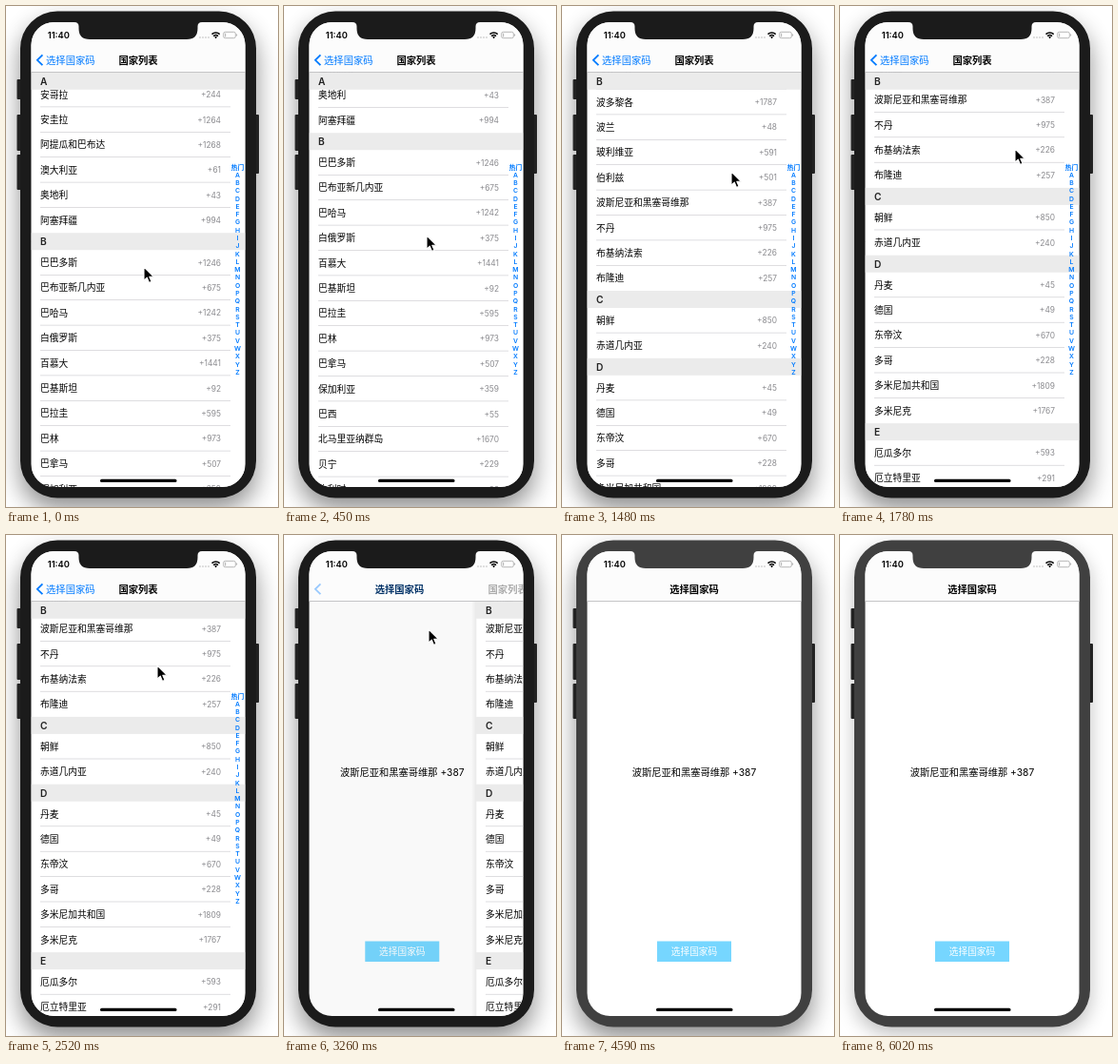
An HTML page that plays this animation: 286x526 px, repeating every 6.12 s.

```html
<!DOCTYPE html>
<html lang="zh-CN">
<head>
<meta charset="utf-8">
<title>国家列表</title>
<style>
  html, body { margin: 0; width: 100%; height: 100%; overflow: hidden; background: #fff; }
  svg { display: block; width: 286px; height: 526px; }
  text { font-family: Inter, "Noto Sans CJK SC", "Noto Sans CJK", sans-serif; white-space: pre; }
</style>
</head>
<body>
<svg id="stage" viewBox="0 0 286 526" xmlns="http://www.w3.org/2000/svg">
  <defs>
    <clipPath id="screenClip"><rect x="26.5" y="17" width="225" height="488" rx="24"/></clipPath>
    <clipPath id="bodyClip"><rect x="26.5" y="69.8" width="225" height="436"/></clipPath>
    <filter id="softActive" x="-30%" y="-20%" width="160%" height="140%"><feGaussianBlur stdDeviation="13"/></filter>
    <filter id="softIdle" x="-30%" y="-20%" width="160%" height="140%"><feGaussianBlur stdDeviation="10"/></filter>
    <linearGradient id="edge"><stop offset="0" stop-opacity="0"/><stop offset="1" stop-opacity=".07"/></linearGradient>
  </defs>

  <rect id="shadowActive" x="15" y="18" width="248" height="511" rx="39" opacity=".44" filter="url(#softActive)"/>
  <rect id="shadowIdle" x="15" y="13" width="248" height="511" rx="39" opacity=".25" filter="url(#softIdle)"/>

  <g fill="#222">
    <rect x="11.5" y="77" width="6" height="21" rx="1"/>
    <rect x="11.5" y="114" width="6" height="38" rx="1"/>
    <rect x="11.5" y="156" width="6" height="37" rx="1"/>
    <rect x="260" y="114" width="6" height="62" rx="1"/>
  </g>
  <rect class="bezel" x="15" y="5.5" width="248" height="511" rx="39"/>

  <g clip-path="url(#screenClip)">
    <rect x="26" y="17" width="226" height="489" fill="#fff"/>
    <g clip-path="url(#bodyClip)">
      <g id="home"><rect x="100" y="426.5" width="78" height="21.5" fill="#76d6ff"/></g>
      <rect id="dim" x="26" y="69" width="226" height="437"/>
      <g id="page">
        <rect x="21" y="69" width="5.5" height="437" fill="url(#edge)"/>
        <rect x="26.5" y="69" width="226" height="437" fill="#fff"/>
        <g id="rows"></g>
        <g id="headers"></g>
        <g id="index"></g>
      </g>
    </g>
    <rect x="26" y="17" width="226" height="52.5" fill="#fcfcfc"/>
    <rect x="26" y="69.1" width="226" height=".8" fill="#b8b8ba"/>
    <g id="nav">
      <path id="chevron" d="M38.4 51.4 32.9 56.8 38.4 62.2" fill="none" stroke="#007aff" stroke-width="1.8"/>
    </g>
    <g id="status">
      <g fill="#b9b9b9">
        <circle cx="204" cy="33" r=".8"/><circle cx="207" cy="33" r=".8"/>
        <circle cx="210" cy="33" r=".8"/><circle cx="213" cy="33" r=".8"/>
      </g>
      <g fill="none" stroke="#000" stroke-width="1.5">
        <path d="M216.5 29.6a6 6 0 0 1 8.2 0M218.2 31.6a3.6 3.6 0 0 1 4.8 0"/>
      </g>
      <path d="M219.2 32.7a2 2 0 0 1 2.8 0l-1.4 1.5z"/>
      <rect x="228.7" y="27.3" width="12.6" height="6.4" rx="1.8" fill="#fff" stroke="#a5a5a5" stroke-width=".8"/>
      <rect x="230" y="28.6" width="1.2" height="3.8" rx=".5" fill="#bbb"/>
      <path d="M242.2 29.3v2.4q1-.3 1-1.2t-1-1.2" fill="#a5a5a5"/>
    </g>
    <path class="bezel" d="M72 16V17Q76.5 17 76.5 21.5V23.5Q76.5 35 88 35H190Q201.5 35 201.5 23.5V21.5Q201.5 17 206 17V16Z"/>
    <rect x="99" y="496.8" width="80.5" height="3.1" rx="1.5"/>
  </g>
  <path id="cursor" d="M0 0V14.2L3.3 11.2 5.5 16.4 8 15.3 5.8 10.3H10.4Z" stroke="#fff" stroke-width="1.1" stroke-linejoin="round"/>
</svg>

<script>
const LOOP = 6120, STEP = 148, IDLE_AT = 6020;
const NAV_BOTTOM = 69.8, ROW = 26.4, HEADER = 18, MID = 139;
const BLUE = '#007aff';
const $ = id => document.getElementById(id);

const sections = {
  A: '安哥拉 244,安圭拉 1264,阿提瓜和巴布达 1268,澳大利亚 61,奥地利 43,阿塞拜疆 994',
  B: '巴巴多斯 1246,巴布亚新几内亚 675,巴哈马 1242,白俄罗斯 375,百慕大 1441,巴基斯坦 92,' +
     '巴拉圭 595,巴林 973,巴拿马 507,保加利亚 359,巴西 55,北马里亚纳群岛 1670,贝宁 229,' +
     '比利时 32,冰岛 354,博茨瓦纳 267,波多黎各 1787,波兰 48,玻利维亚 591,伯利兹 501,' +
     '波斯尼亚和黑塞哥维那 387,不丹 975,布基纳法索 226,布隆迪 257',
  C: '朝鲜 850,赤道几内亚 240',
  D: '丹麦 45,德国 49,东帝汶 670,多哥 228,多米尼加共和国 1809,多米尼克 1767',
  E: '厄瓜多尔 593,厄立特里亚 291'
};

function add(parent, tag, attrs) {
  const node = document.createElementNS('http://www.w3.org/2000/svg', tag);
  for (const key in attrs) node.setAttribute(key, attrs[key]);
  return parent.appendChild(node);
}

// y is the vertical middle of the glyphs
function label(parent, str, x, y, size, attrs) {
  const node = add(parent, 'text', { x, y: y + size * 0.37, 'font-size': size, ...attrs });
  node.textContent = str;
  return node;
}

const centred = { 'text-anchor': 'middle' };
const shift = (node, x, y) => node.setAttribute('transform', `translate(${x} ${y})`);

const headers = [];
let y = 79.8 - HEADER;
for (const [letter, list] of Object.entries(sections)) {
  const group = add($('headers'), 'g', {});
  add(group, 'rect', { x: 26, y: 0, width: 226, height: HEADER, fill: '#ebebeb' });
  label(group, letter, 36, 9.2, 10.2, { 'font-weight': 600, fill: '#222' });
  headers.push({ group, top: y });
  y += HEADER;
  list.split(',').forEach((entry, i, all) => {
    const [name, code] = entry.split(' ');
    label($('rows'), name, 36, y + ROW / 2, 9.75, {});
    label($('rows'), '+' + code, 226, y + ROW / 2, 8.4, { 'text-anchor': 'end', fill: '#8a8a8e' });
    y += ROW;
    if (i < all.length - 1) {
      add($('rows'), 'rect', { x: 36, y: y - 0.6, width: 200, height: 0.6, fill: '#c8c7cc' });
    }
  });
}

['热门', ...'ABCDEFGHIJKLMNOPQRSTUVWXYZ'].forEach((mark, i) =>
  label($('index'), mark, 243.5, 169 + i * 8.28, 6.8, { ...centred, fill: BLUE, 'font-weight': 600 }));

label($('home'), '波斯尼亚和黑塞哥维那 +387', MID, 249, 10.25, centred);
label($('home'), '选择国家码', MID, 437.3, 9.7, { ...centred, fill: '#fff' });
label($('status'), '11:40', 55.3, 30.6, 9.3, { ...centred, 'font-weight': 600 });
const homeTitle = label($('nav'), '选择国家码', 0, 56.8, 10.3, centred);
const listTitle = label($('nav'), '国家列表', 0, 56.8, 10.3, { ...centred, 'font-weight': 600 });

// Tracks: [step, value...]
const scrollTrack = [[0, 0], [3, 105], [6, 148.4], [7, 215], [8, 350], [9, 490],
  [10, 590.8], [11, 660], [12, 698.9]];
const popTrack = [[20, 0], [21, 0.1], [22, 0.782], [23, 0.96], [24, 1]];
const cursorTrack = [[0, 145, 274], [2, 149, 220], [4, 151, 262], [6, 152, 314], [8, 165, 230],
  [10, 178, 174], [12, 184, 150], [14, 184, 150], [17, 159, 137], [19, 152, 99], [23, 152, 99],
  [25, 166, 165], [27, 208, 345], [29, 230, 452], [30, 232, 468]];

function sample(track, step) {
  const next = track.findIndex(key => key[0] > step);
  if (next < 0) return track[track.length - 1].slice(1);
  if (next === 0) return track[0].slice(1);
  const a = track[next - 1], b = track[next];
  const k = (step - a[0]) / (b[0] - a[0]);
  return a.slice(1).map((v, i) => v + (b[i + 1] - v) * k);
}

function drawList(scroll) {
  shift($('rows'), 0, -scroll);
  headers.forEach(({ group, top }, i) => {
    const limit = i + 1 < headers.length ? headers[i + 1].top - scroll - HEADER : Infinity;
    shift(group, 0, Math.min(Math.max(top - scroll, NAV_BOTTOM), limit));
  });
}

function drawPop(p) {
  const fade = (1 - p) ** 0.6;
  shift($('page'), 225 * p, 0);
  $('page').style.display = p < 1 ? '' : 'none';
  shift($('home'), -67.5 * (1 - p), 0);
  $('dim').setAttribute('opacity', 0.1 * (1 - p));
  $('chevron').setAttribute('opacity', fade);
  listTitle.setAttribute('opacity', fade * 0.8 + (p === 0 ? 0.2 : 0));
  listTitle.setAttribute('x', MID + 123 * p);
  homeTitle.setAttribute('x', 67.8 + (MID - 67.8) * p ** 1.15);
  homeTitle.setAttribute('fill', `rgb(0, ${122 * fade}, ${255 * fade})`);
  homeTitle.setAttribute('font-weight', p > 0.3 ? 600 : 400);
}

function render(time) {
  const step = Math.floor((time + 6) / STEP);
  const left = step >= 31, idle = time >= IDLE_AT;
  drawList(sample(scrollTrack, step)[0]);
  drawPop(sample(popTrack, step)[0]);
  shift($('cursor'), ...sample(cursorTrack, step));
  $('cursor').style.display = left ? 'none' : '';
  for (const part of document.querySelectorAll('.bezel')) {
    part.setAttribute('fill', left ? '#404040' : '#1b1b1b');
  }
  $('shadowActive').style.display = idle ? 'none' : '';
  $('shadowIdle').style.display = idle ? '' : 'none';
}

const start = performance.now();
function tick() {
  render((performance.now() - start) % LOOP);
  requestAnimationFrame(tick);
}
tick();
</script>
</body>
</html>
```
